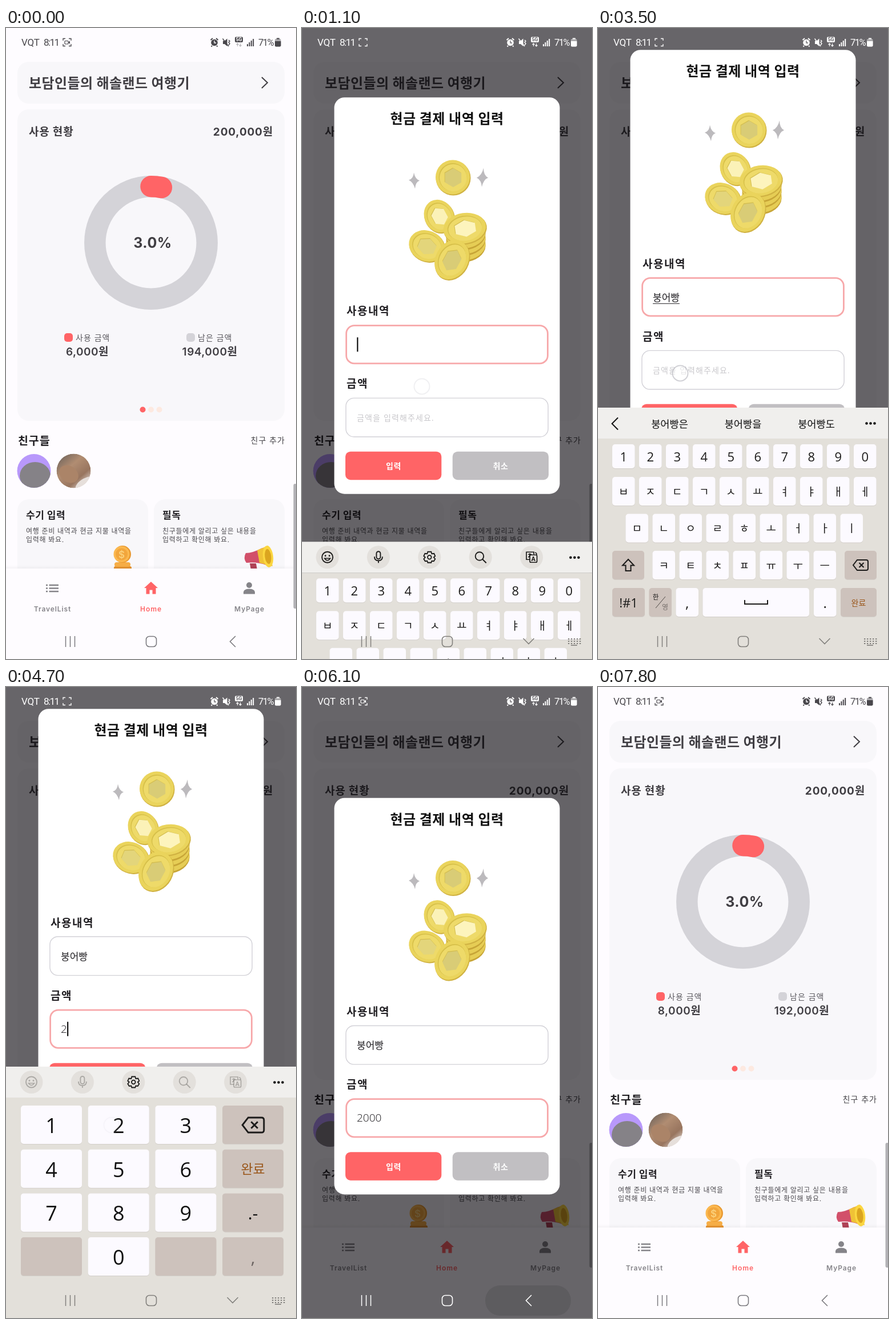
An HTML page with a canvas for the animation above (8 s loop, 508 px wide and 1102 px high).

```html
<!DOCTYPE html>
<html lang="ko">
<head>
<meta charset="utf-8">
<style>
html, body { margin: 0; width: 100%; height: 100%; overflow: hidden; background: #fefcff; }
canvas { display: block; width: 508px; height: 1102px; }
</style>
</head>
<body>
<canvas width="508" height="1102"></canvas>
<script>
const c = document.querySelector('canvas').getContext('2d');
const KR = 'Inter, "Noto Sans CJK KR", "Noto Sans CJK", sans-serif';
const SYS = 'Roboto, "Noto Sans CJK KR", sans-serif';
const KEY = '"Open Sans", "Noto Sans CJK KR", sans-serif';
const RED = '#ff6466', INK = '#403e43', PAPER = '#fefcff', CARD = '#f8f7fa', DARK_KEY = '#cdc2bc';

const clamp = v => Math.max(0, Math.min(1, v));
const ramp = (t, a, b) => clamp((t - a) / (b - a));
const ease = p => 1 - (1 - p) ** 3;

function text(s, x, y, size, color, { w = 400, a = 'left', ls = 0, f = KR } = {}) {
  c.font = `${w} ${size}px ${f}`;
  c.textAlign = a;
  c.letterSpacing = ls + 'px';
  c.fillStyle = color;
  c.fillText(s, x, y);
}
function box(x, y, w, h, r, fill, stroke, lw) {
  c.beginPath();
  c.roundRect(x, y, w, h, r);
  if (fill) { c.fillStyle = fill; c.fill(); }
  if (stroke) { c.strokeStyle = stroke; c.lineWidth = lw; c.stroke(); }
}
function oval(x, y, rx, ry, rot, fill) {
  c.beginPath();
  c.ellipse(x, y, rx, ry, rot, 0, 7);
  c.fillStyle = fill;
  c.fill();
}
const dot = (x, y, r, fill) => oval(x, y, r, r, 0, fill);
function line(d, color, lw) {
  c.strokeStyle = color;
  c.lineWidth = lw;
  c.stroke(new Path2D(d));
}
function shape(d, color) {
  c.fillStyle = color;
  c.fill(new Path2D(d));
}
function at(x, y, draw, alpha = 1) {
  c.save();
  c.translate(x, y);
  c.globalAlpha *= alpha;
  draw();
  c.restore();
}
function clipDot(x, y, r, draw) {
  c.save();
  c.beginPath();
  c.arc(x, y, r, 0, 7);
  c.clip();
  draw();
  c.restore();
}

// Typed letters: time, touch point, resulting word
const typing = [
  [1450, 52, 832, 'ㅂ'], [1650, 367, 937, '부'], [1900, 168, 878, '붕'],
  [2150, 166, 880, '붕ㅇ'], [2350, 358, 882, '붕어'], [2750, 50, 820, '붕어ㅃ'],
  [2900, 404, 880, '붕어빠'], [3000, 168, 880, '붕어빵']
];
const digits = [[4420, 185, 765, '2'], [4980, 200, 996, '20'], [5200, 198, 998, '200'], [5420, 201, 995, '2000']];
const touches = [
  [100, 132, 890], [850, 210, 626], [2580, 54, 938], [3420, 144, 603], [5800, 397, 1071], [6600, 165, 838],
  ...typing, ...digits
];
const last = (list, t) => list.filter(e => e[0] <= t).pop();

function statusBar(t, k) {
  const inner = k === '#fff' ? '#67656a' : PAPER;
  text('VQT', 27, 31, 17, k, { f: SYS, ls: -0.2 });
  text('8:11', 66, 31, 17, k, { f: SYS, ls: -1.6 });
  line('M100 22V18.500H104M110 18.500H114V22M114 28V31.500H110M104 31.500H100V28', k, 1.3);
  if (t < 300 || t > 5850) {
    box(103, 22.5, 6, 5.5, 1, null, k, 1.2);
    shape('M109 25L112 22.500V28Z', k);
  }
  dot(365, 25.5, 5.8, k);
  line('M358.500 21L362 18M371.500 21L368 18M361 31L359.500 32.500M369 31L370.500 32.500', k, 2);
  line('M365 22V26H368', inner, 1.3);
  shape('M380 22.500H383L387.500 18.500V32L383 28H380Z', k);
  line('M379.500 18.500L390 32M390 21L392 23L390 25L392 27L390 30', k, 1.4);
  box(401, 15.5, 14, 9.5, 2, k);
  text('5G', 408, 23.4, 8.5, inner, { w: 700, a: 'center', f: SYS });
  at(0, 0, () => line('M405.500 32V27M403.500 29L405.500 27L407.500 29M410.500 27V32M408.500 30L410.500 32L412.500 30', k, 1.2), t < 100 ? 0.4 : 1);
  for (let i = 0; i < 4; i++) box(422 + i * 3.4, 28 - i * 3, 2, 4 + i * 3, 0.5, k);
  text('71%', 442, 31, 16.5, k, { f: SYS, ls: -1.5 });
  box(474, 17.5, 5, 2, 0, k);
  at(0, 0, () => box(471, 19, 10.5, 13.5, 2, k), 0.45);
  box(471, 23, 10.5, 9.5, [0, 0, 2, 2], k);
}

function systemNav(k, keys) {
  for (const x of [104.5, 112.5, 120.5]) line(`M${x} 1062V1081`, k, 1.5);
  box(245.5, 1062.5, 18, 18, 5.5, null, k, 1.6);
  line(keys ? 'M387.500 1066L397 1075.500L406.500 1066' : 'M402 1062L392.500 1071.500L402 1081', k, 1.6);
  if (!keys) return;
  for (let i = 0; i < 15; i++) box(466 + i % 5 * 5, 1066 + (i / 5 | 0) * 4, 2.4, 2, 0, k);
  line('M471 1078H482', k, 1.6);
}

function avatars() {
  clipDot(49, 773.5, 29.5, () => {
    dot(49, 773.5, 30, '#b898fb');
    oval(51, 782, 27, 24, 0, '#858287');
  });
  clipDot(118.5, 773.5, 30, () => {
    const g = c.createLinearGradient(95, 748, 142, 802);
    g.addColorStop(0, '#75675d');
    g.addColorStop(0.35, '#b18d72');
    g.addColorStop(0.7, '#98755f');
    g.addColorStop(1, '#e9e3df');
    dot(118.5, 773.5, 30, g);
    oval(110, 779, 18, 14, 0.6, '#ab8468');
    oval(140, 795, 20, 9, -0.5, '#e6dfdb');
  });
}

function cardArt() {
  box(189, 940, 31, 8, 3, '#e4922f');
  box(190, 933, 28, 8, 4, '#f6ad45');
  dot(204, 919, 15, '#e8982f');
  dot(202.5, 919, 14, '#fbb84f');
  dot(202.5, 919, 10.5, '#f2a63c');
  text('$', 202.5, 925.5, 17, '#fbd07a', { a: 'center', w: 600 });
  shape('M427 935H438L440 946H429Z', '#b04256');
  shape('M420 917Q432 917 449 908L456 938Q440 932 421 934Q415 926 420 917Z', '#d2506a');
  shape('M440 912L459 904L467 940L444 934Z', '#efc236');
  oval(459, 923, 9, 19, -0.12, '#fbd640');
  oval(459, 923, 5.5, 13, -0.12, '#dba51f');
}

function home(t) {
  c.fillStyle = PAPER;
  c.fillRect(0, 0, 508, 1102);
  box(20, 59, 468, 73, 20, CARD);
  text('보담인들의 해솔랜드 여행기', 40, 104.5, 24, INK, { w: 700, ls: 0.4 });
  line('M448 86L458 95.500L448 105', INK, 2);
  box(20, 142, 468, 544, 20, CARD);
  text('사용 현황', 40, 188, 19, INK, { w: 700, ls: 0.8 });
  text('200,000원', 468, 188, 19, INK, { w: 700, a: 'right', ls: 0.8 });

  c.lineWidth = 37.5;
  c.strokeStyle = '#d4d3d8';
  c.beginPath();
  c.arc(254, 375, 98.2, 0, 7);
  c.stroke();
  c.lineCap = 'round';
  c.strokeStyle = RED;
  c.beginPath();
  c.arc(254, 375, 98.2, -Math.PI / 2, -Math.PI / 2 + 0.03 * 2 * Math.PI);
  c.stroke();
  c.lineCap = 'butt';
  text('3.0%', 257, 384, 25, INK, { w: 700, a: 'center', ls: 0.5 });

  const paid = t >= 7200;
  box(102, 533, 15, 15, 5, RED);
  box(316, 533, 15, 15, 5, '#d4d3d8');
  text('사용 금액', 122, 546, 14, '#5a585e', { ls: 1 });
  text('남은 금액', 336, 546, 14, '#5a585e', { ls: 1 });
  text(paid ? '8,000원' : '6,000원', 142.5, 572, 19, INK, { w: 600, a: 'center', ls: 0.5 });
  text(paid ? '192,000원' : '194,000원', 357, 572, 19, INK, { w: 600, a: 'center', ls: 0.5 });
  [RED, '#fde9e0', '#fde9e0'].forEach((k, i) => dot(239.5 + i * 14.5, 666.5, 5, k));

  text('친구들', 21, 728, 19.5, '#222024', { w: 700, ls: 0.9 });
  text('친구 추가', 489, 725, 14, '#444247', { a: 'right', ls: 1 });
  avatars();

  const cards = [
    [20, '수기 입력', '여행 준비 내역과 현금 지물 내역을', '입력해 봐요.'],
    [259, '필독', '친구들에게 알리고 싶은 내용을', '입력하고 확인해 봐요.']
  ];
  for (const [x, title, a, b] of cards) {
    box(x, 823, 229, 140, 20, CARD);
    text(title, x + 15, 857, 17, '#222024', { w: 700, ls: 0.5 });
    text(a, x + 15, 883, 12, '#4c4a4f', { ls: 0.7 });
    text(b, x + 15, 898, 12, '#4c4a4f', { ls: 0.7 });
  }
  cardArt();

  const g = c.createLinearGradient(0, 938, 0, 944);
  g.addColorStop(0, '#0000');
  g.addColorStop(1, '#00000009');
  c.fillStyle = g;
  c.fillRect(0, 938, 508, 6);
  c.fillStyle = PAPER;
  c.fillRect(0, 944, 508, 158);
  const grey = '#858489';
  for (const y of [973, 978.5, 984]) line(`M70 ${y}H73M75.500 ${y}H92`, grey, 2.3);
  shape('M254 967L266 978H262.500V988.500H256.500V981.500H251.500V988.500H245.500V978H242Z', RED);
  dot(426, 973, 5, grey);
  shape('M416 988.500V985Q417 979.500 426 979.500Q435 979.500 436 985V988.500Z', grey);
  [['TravelList', 81.5, grey], ['Home', 254, RED], ['MyPage', 426.5, grey]].forEach(([s, x, k]) =>
    text(s, x, 1019, 12, k, { w: 600, a: 'center', ls: 0.9 }));
  box(503.5, 796, 6, 218, 3, '#b3b2b6');
}

function coin(x, y, rx, ry, rot, tone) {
  const hexagon = 'M0 -1L.87 -.5V.5L0 1L-.87 .5V-.5Z';
  oval(x + 1, y + 1.5, rx, ry, rot, '#d0b242');
  oval(x, y, rx - 0.5, ry - 0.5, rot, '#ead45c');
  oval(x, y, rx * 0.8, ry * 0.8, rot, '#d6bf49');
  oval(x + 0.8, y + 1, rx * 0.78, ry * 0.78, rot, '#eeda69');
  c.save();
  c.translate(x, y);
  c.rotate(rot);
  c.scale(rx * 0.54, ry * 0.54);
  shape(hexagon, '#d3bd50');
  c.translate(0.05, 0.06);
  shape(hexagon, tone);
  c.restore();
}
function coins() {
  coin(264, 333, 30.5, 30.5, 0, '#d9cc76');
  shape('M196 325Q198 336 206 339Q199 341 198 353Q195 342 187 338Q195 336 196 325Z', '#bcbabd');
  shape('M318 317Q318 330 326 334Q318 337 315 350Q314 338 306 334Q315 330 318 317Z', '#bcbabd');
  coin(240, 401, 26, 30, -0.5, '#fbf2b8');
  for (const y of [456, 445, 435]) {
    oval(287, y, 35, 25, -0.2, '#c7a537');
    oval(287, y - 3, 35, 25, -0.2, '#e6cd55');
  }
  coin(285, 422, 38, 27, -0.15, '#fdf4bd');
  coin(218.5, 453, 32.5, 27, 0.4, '#e3d57b');
  coin(262.5, 477, 29, 36.5, 0.5, '#d9cc76');
}

// The outline keeps its outer edge and grows inward when focused
function field(y, { value, hint, focus, caret, underline, size, font, weight = 400 }) {
  const lw = focus ? 2.8 : 1.4;
  box(76.2 + lw / 2, y + lw / 2, 355.6 - lw, 69 - lw, 14, '#fff', focus ? '#f7a8aa' : '#d2d1d7', lw);
  if (!value && !focus) text(hint, 96, y + 40, 14, '#c9c8cc', { ls: 1.1 });
  text(value, 96, y + 41.2, size, '#222024', { w: weight, f: font });
  const end = 96 + c.measureText(value).width;
  if (underline && value) line(`M96 ${y + 46}H${end}`, '#222024', 1);
  if (caret) box(end + 0.2, y + 22, 2.2, 25, 0, '#111');
}

function dialog(t) {
  box(56.5, 193.7, 395, 692.5, 18, '#fff');
  text('현금 결제 내역 입력', 254, 239.5, 24, '#111', { w: 700, a: 'center', ls: 0.5 });
  coins();
  text('사용내역', 78, 574, 19, '#222024', { w: 600, ls: 1.5 });
  text('금액', 78, 701, 19, '#222024', { w: 600, ls: 1.5 });
  const [wordTime, , , word] = last(typing, t) || [950, 0, 0, ''];
  const [sumTime, , , sum] = last(digits, t) || [3600, 0, 0, ''];
  const first = t >= 950 && t < 3600, second = t >= 3600;
  const blink = since => (t - since) % 1000 < 500;
  field(590.8, {
    value: word, hint: '사용 내역을 입력해 주세요.', focus: first, underline: first,
    caret: first && blink(wordTime), size: 17, font: KR
  });
  field(718.2, {
    value: sum, hint: '금액을 입력해주세요.', focus: second,
    caret: second && blink(sumTime), size: 19, font: KEY, weight: 300
  });
  box(76, 812.2, 168.3, 49.5, 9, t > 6600 && t < 6800 ? '#f2595b' : RED);
  box(263.7, 812.2, 168.3, 49.5, 9, '#c1bfc2');
  text('입력', 160.5, 842.5, 14, '#fff', { w: 700, a: 'center', ls: 0.6 });
  text('취소', 348, 842.5, 14, '#fff', { w: 700, a: 'center', ls: 0.6 });
}

function toolbar(t, numeric) {
  c.fillStyle = '#f0efed';
  c.fillRect(0, 663, 508, 54);
  for (const x of [470.5, 477.5, 484.5]) dot(x, 690.5, 2.3, '#111');
  if (t >= 1850 && t < 3700) {
    line('M35 680.500L24.500 691L35 701.500', '#111', 2);
    ['은', '을', '도'].forEach((s, i) =>
      text(last(typing, t)[3] + s, 125.5 + i * 128.5, 697.5, 17.6, '#111', { a: 'center' }));
    return;
  }
  const k = '#1c1b1a';
  const icons = [
    () => {
      box(-9.5, -9.5, 19, 19, 9.5, null, k, 1.9);
      dot(-3.5, -2.5, 1.4, k);
      dot(3.5, -2.5, 1.4, k);
      line('M-5 2Q0 9 5 2Z', k, 1.6);
    },
    () => {
      box(-3.5, -10, 7, 13, 3.5, null, k, 1.9);
      line('M-7 -1Q-7 6 0 6Q7 6 7 -1M0 6V10', k, 1.9);
    },
    () => {
      line('M-3 -9.500H3L4 -6L8 -6.500L10 -2L7.500 0L10 3L7.500 7L4 6.500L3 9.500H-3L-4 6.500L-7.500 7L-10 3L-7.500 0L-10 -2L-8 -6.500L-4 -6Z', k, 1.8);
      box(-3.3, -3.3, 6.6, 6.6, 3.3, null, k, 1.8);
    },
    () => {
      box(-9, -9, 14.5, 14.5, 7.25, null, k, 1.9);
      line('M3.500 3.500L10 10', k, 2);
    },
    () => {
      line('M-3 4H-9V-9H4V-5M-6 -5H0M-3 -7V-5Q-3 -1 -6 0M6 -8Q9 -8 9 -4', k, 1.7);
      box(-3, -4, 12.5, 13, 2, null, k, 1.7);
      text('A', 3.2, 7, 11, k, { w: 700, a: 'center', f: SYS });
    }
  ];
  icons.forEach((draw, i) => at(44.5 + i * 89.4, 690, () => {
    dot(0, 0, 20, '#e3e0dc');
    at(0, 0, draw, numeric && i !== 2 ? 0.28 : 1);
  }));
}

function key(x, y, w, h, label, { dark, size = 20, color = '#1c1b1a', weight = 400 } = {}) {
  box(x, y + 1, w, h, 5, '#d3cfca');
  box(x, y, w, h, 5, dark ? DARK_KEY : '#fcfaff');
  if (label) text(label, x + w / 2, y + h / 2 + size * 0.4, size, color, { a: 'center', f: KEY, w: weight });
}
function eraser(x, y, s) {
  at(x, y, () => {
    c.scale(s, s);
    line('M-13 0L-6 -9H10Q13 -9 13 -6V6Q13 9 10 9H-6ZM-2.500 -4L5.500 4M5.500 -4L-2.500 4', '#1c1b1a', 2);
  });
}

function letterKeys(t) {
  const shift = t >= 2600 && t < 2850;
  const rows = [
    [25, 727, 42, '1234567890', 22],
    [25, 784, 50, shift ? 'ㅃㅉㄸㄲㅆㅛㅕㅑㅒㅖ' : 'ㅂㅈㄷㄱㅅㅛㅕㅑㅐㅔ', 19],
    [48.5, 848.5, 50, 'ㅁㄴㅇㄹㅎㅗㅓㅏㅣ', 19],
    [95.5, 913, 50, 'ㅋㅌㅊㅍㅠㅜㅡ', 19]
  ];
  let pop;
  const tap = typing.find(e => t >= e[0] && t < e[0] + 130);
  for (const [x0, y, h, row, size] of rows)
    [...row].forEach((s, i) => {
      const x = x0 + i * 47;
      key(x, y, 39.5, h, s, { size, weight: size < 20 ? 500 : 400 });
      if (tap && tap[1] > x - 3 && tap[1] < x + 43 && tap[2] > y && tap[2] < y + h) pop = [x + 19.7, y + h / 2, s];
    });
  const arrow = 'M53 928L63 938.500H57.500V948H48.500V938.500H43Z';
  key(25, 913, 56, 50, '', { dark: true });
  line(arrow, '#1c1b1a', 2);
  if (shift) shape(arrow, '#1c1b1a');
  key(432, 913, 56, 50, '', { dark: true });
  eraser(460, 938, 1);
  key(25, 978, 57, 50, '!#1', { dark: true, size: 22 });
  key(89.5, 978, 39.5, 50, '', { dark: true });
  text('한', 101, 998, 11.5, '#1c1b1a', { a: 'center', w: 500 });
  text('영', 117.5, 1016, 12, '#77706c', { a: 'center' });
  line('M101 1013L118 993', '#4c4744', 1);
  key(136.5, 978, 39.5, 50, ',', { size: 24 });
  key(183.5, 978, 186.5, 50);
  line('M257 999V1006H297V999', '#1c1b1a', 2);
  key(378, 978, 39.5, 50, '.', { size: 24 });
  key(425, 978, 63, 50, '완료', { dark: true, size: 14, color: '#9a571b' });
  if (!pop) return;
  c.save();
  c.shadowColor = '#0005';
  c.shadowBlur = 5;
  c.shadowOffsetY = 2;
  box(pop[0] - 38, pop[1] - 132, 76, 98, 10, '#f9f7fb');
  c.restore();
  text(pop[2], pop[0], pop[1] - 69, 31, '#1c1b1a', { a: 'center', w: 500, f: KEY });
}

function numberKeys() {
  const labels = ['1', '2', '3', '', '4', '5', '6', '완료', '7', '8', '9', '.-', '', '0', '', ','];
  labels.forEach((s, i) => {
    const dark = i % 4 === 3 || !s;
    const size = s === '완료' ? 23 : dark ? 30 : 36;
    const color = s === '완료' ? '#9a571b' : s === ',' ? '#6c6562' : '#111';
    key(26 + i % 4 * 117.7, 731 + (i / 4 | 0) * 76.7, 107, 67, s, { dark, size, color });
  });
  eraser(433, 765, 1.45);
}

function keyboard(t) {
  const numeric = t >= 3700;
  c.fillStyle = '#e3e0da';
  c.fillRect(0, 717, 508, 385);
  toolbar(t, numeric);
  numeric ? numberKeys() : letterKeys(t);
}

function touch([start, x, y], t) {
  const age = t - start;
  if (age < 0 || age > 300) return;
  at(x, y, () => {
    dot(0, 0, 14, '#ffffff88');
    box(-13.5, -13.5, 27, 27, 13.5, null, '#a9a8b388', 2);
  }, 1 - ramp(age, 150, 300));
}

function draw(t) {
  home(t);
  const out = 1 - ramp(t, 6850, 7020);
  const dim = ramp(t, 250, 520) * out;
  const shown = ramp(t, 250, 420) * out;
  const up = t < 3000 ? ease(ramp(t, 1050, 1320)) : 1 - ease(ramp(t, 5880, 6080));
  const keys = up > 0.1;

  c.fillStyle = `rgba(2,0,4,${0.595 * dim})`;
  c.fillRect(0, 0, 508, 1102);
  statusBar(t, dim > 0.5 ? '#fff' : '#49474c');
  if (shown > 0) at(0, -155.5 * up, () => dialog(t), shown);
  if (up > 0) at(0, 439 * (1 - up), () => keyboard(t));
  if (t > 5800 && t < 6450) at(0, 0, () => box(321, 1045, 150, 53, 26, '#00000018'), 1 - ramp(t, 6100, 6450));
  systemNav(keys ? '#82807d' : dim > 0.5 ? (t < 600 ? '#d0cfd2' : '#fff') : '#7b7a7f', keys);
  touches.forEach(e => touch(e, t));
}

function frame() {
  draw(performance.now() % 8000);
  requestAnimationFrame(frame);
}
frame();
</script>
</body>
</html>
```
